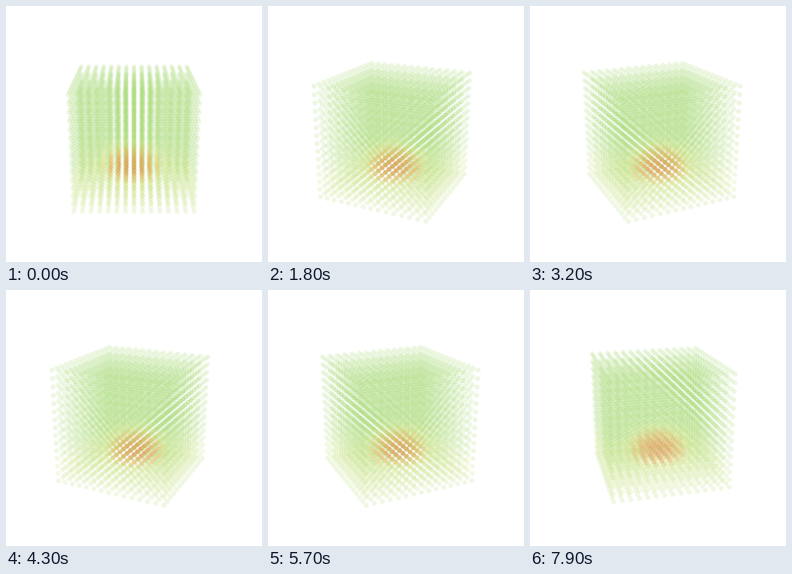
A matplotlib script for the animation above (8000 ms loop, 256 by 256 pixels).

```python
import numpy as np
import matplotlib.pyplot as plt
from matplotlib.animation import FuncAnimation

SIZE, DPI = 256, 100
FRAMES, INTERVAL = 80, 100
N = 15                        # dots per cube edge
STEP = np.radians(3.6)        # turn per frame
ELEV = np.radians(20)
DIST, FOCAL = 8.9, 500        # camera, in half cube edges and pixels
RADIUS = 2.3                  # dot radius at the cube centre

axis = np.linspace(-1, 1, N)
X, Y, Z = (a.ravel() for a in np.meshgrid(axis, axis, axis))


def heat_colors():
    """Green dots, yellower near the floor, with a warm dome in the middle."""
    height = np.where(Z > -0.66, 0.38, 0.14)
    q = ((X + 0.04) ** 2 + Y ** 2) / 0.45 ** 2 + ((Z + 0.66) / height) ** 2
    t = np.exp(-q ** 1.4) + 0.07 * np.exp(-((Z + 0.75) / 0.3) ** 2)
    stops = [0, 0.12, 0.4, 1]
    ramp = np.array([
        [164, 218, 112, 50],
        [226, 232, 120, 50],
        [252, 165, 85, 95],
        [242, 95, 58, 115],
    ]) / 255
    return np.column_stack([np.interp(t, stops, ramp[:, k]) for k in range(4)])


def project(angle):
    c, s = np.cos(angle), np.sin(angle)
    x, y = X * c + Y * s, Y * c - X * s
    depth = DIST - y * np.cos(ELEV) - Z * np.sin(ELEV)
    up = Z * np.cos(ELEV) - y * np.sin(ELEV)
    scale = FOCAL / depth
    return SIZE / 2 + x * scale, SIZE / 2 + up * scale, depth


COLORS = heat_colors()

fig = plt.figure(figsize=(SIZE / DPI, SIZE / DPI), dpi=DPI, facecolor="white")
ax = fig.add_axes([0, 0, 1, 1])
ax.set(xlim=(0, SIZE), ylim=(0, SIZE))
ax.axis("off")
dots = ax.scatter(X, Y, s=np.ones(X.size), c=COLORS, linewidths=0)


def update(i):
    px, py, depth = project(i * STEP)
    order = np.argsort(-depth)
    diameter = 2 * RADIUS * DIST / depth * 72 / DPI
    dots.set_offsets(np.column_stack([px, py])[order])
    dots.set_sizes(diameter[order] ** 2)
    dots.set_facecolors(COLORS[order])
    return (dots,)


anim = FuncAnimation(fig, update, frames=FRAMES, interval=INTERVAL,
                     repeat=True, repeat_delay=0, blit=False)
plt.show()
```
